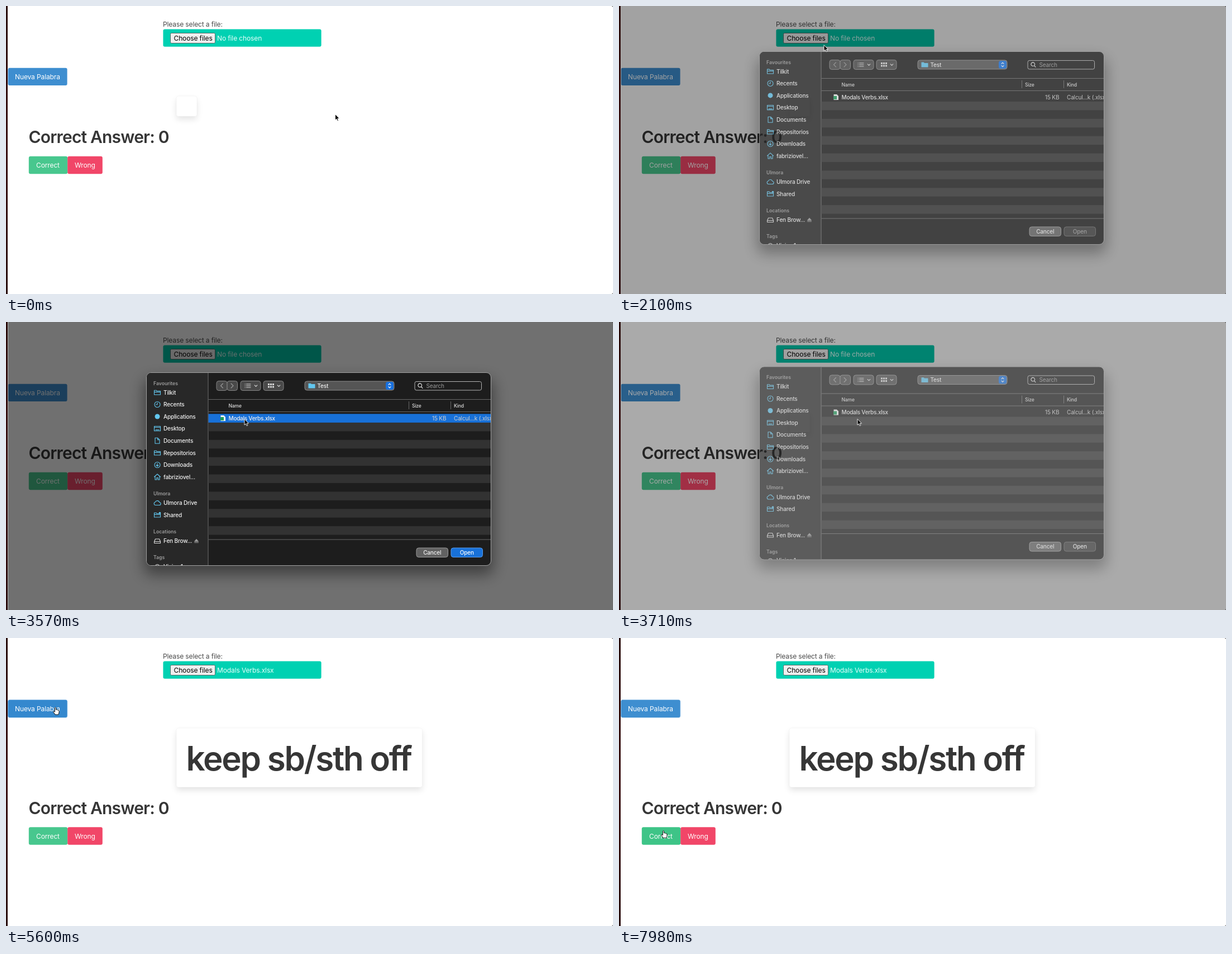
Animation of 1087 by 515 pixels, one loop 8 s. Source, as an HTML page:

```html
<!DOCTYPE html>
<html lang="en">
<head>
<meta charset="utf-8">
<title>Word practice</title>
<style>
  html, body { margin: 0; width: 100%; height: 100%; overflow: hidden; background: #fff; }
  svg { display: block; width: 1087px; height: 515px; }
  text { font-family: Inter, "Liberation Sans", sans-serif; white-space: pre; }
  .body { font-size: 12px; letter-spacing: -.01em; }
  .head { font-size: 30px; font-weight: 600; letter-spacing: -.0275em; fill: #363636; }
  .word { font-size: 60px; font-weight: 600; letter-spacing: -.037em; fill: #363636; }
  .item { font-size: 10px; font-weight: 500; letter-spacing: -.015em; fill: #f2f2f2; }
  .group { font-size: 8.7px; font-weight: 600; fill: #9c9c9c; }
  .col { font-size: 8.6px; font-weight: 500; letter-spacing: -.02em; fill: #dcdcdc; }
  .icon { fill: none; stroke: #62c6ee; stroke-width: 1.1; stroke-linejoin: round; stroke-linecap: round; }
  .soft { filter: blur(6px); }
  .deep { filter: blur(13px); }
</style>
</head>
<body>
<svg viewBox="0 0 1087 515">
  <defs>
    <linearGradient id="edge" x1="0" y1="0" x2="0" y2="1">
      <stop offset="0" stop-color="#2a0d0c"/>
      <stop offset=".5" stop-color="#3c1213"/>
      <stop offset="1" stop-color="#2a0d0e"/>
    </linearGradient>
    <clipPath id="panel"><rect x="252" y="91" width="616" height="344" rx="8"/></clipPath>
  </defs>

  <rect width="1087" height="515" fill="#fff"/>

  <text class="body" x="281" y="37" fill="#4a4a4a">Please select a file:</text>
  <rect id="input" x="281.4" y="41.5" width="283.2" height="31.2" rx="3"/>
  <rect x="294.5" y="48.5" width="80" height="18" rx="2" fill="#efefef" stroke="#5c6b68"/>
  <text class="body" x="300.5" y="62" fill="#000">Choose files</text>
  <text class="body" id="file" x="378" y="62" fill="#e9fffb"></text>

  <rect id="ring" x="3" y="110" width="107.3" height="33" rx="4" fill="#b9d7f0"/>
  <rect id="next" x="3.6" y="110.7" width="106" height="31.4" rx="3"/>
  <text class="body" x="16" y="131" fill="#fff">Nueva Palabra</text>

  <rect id="shade" class="soft" x="305.5" y="167" fill="#0a0a0a" opacity=".11"/>
  <rect id="card" x="305" y="161" rx="4" fill="#fff" stroke="#0a0a0a" stroke-opacity=".03"/>
  <text class="word" id="word" x="322.5" y="237">keep sb/sth off</text>

  <g id="score">
    <text class="head" x="40.5" y="245">Correct Answer: 0</text>
    <rect id="right" x="40.8" y="268.8" width="69.4" height="31.4" rx="3"/>
    <rect id="wrong" x="110.2" y="268.8" width="62.6" height="31.4" rx="3"/>
    <text class="body" x="54" y="289" fill="#fff">Correct</text>
    <text class="body" x="123" y="289" fill="#fff">Wrong</text>
  </g>

  <rect id="dim" x="3" width="1084" height="515" fill="#000"/>
  <rect id="rim" x="3" width="1" height="515" fill="#b4b4b4"/>
  <rect width="3" height="515" fill="url(#edge)"/>
  <path d="M1087 512v3h-3q3 0 3-3M1084 0h3v2q-1-2-3-2" fill="#555"/>

  <g id="dialog">
    <rect class="deep" x="247" y="102" width="626" height="350" rx="14" fill="#000" opacity=".42"/>
    <rect x="251.5" y="90.5" width="617" height="345" rx="8.5" fill="#1d1d1d" stroke="#a2a2a2"/>
    <g id="content" clip-path="url(#panel)"></g>
  </g>

  <g id="cursor" stroke-linejoin="round">
    <path id="arrow" d="M0 0V10.6L2.5 8.4L4.1 12.1L5.9 11.3L4.3 7.7H7.5Z" fill="#000" stroke="#fff" stroke-width=".9"/>
    <path id="hand" d="M-1.1 .9Q0 -.7 1.1 .9V4.4Q2.2 3.5 3.1 4.8Q4.2 4 5 5.2Q6.4 4.7 6.5 6.4V9.2Q6.3 11 5.2 13H-.5Q-1.5 10.9-3.6 8.7Q-4.3 7.2-2.9 6.9L-1.1 8.2Z"
      fill="#fff" stroke="#111" stroke-width="1"/>
  </g>
</svg>

<script>
const LOOP = 8000, STEP = 70;
const OPEN = 2030, SELECT = 3360, CLOSE = 3710, CLOSED = 3920, NEW_WORD = 5110;
const SHIFT = 69.5;
const $ = id => document.getElementById(id);

function add(tag, attrs, label) {
  const node = document.createElementNS('http://www.w3.org/2000/svg', tag);
  for (const key in attrs) node.setAttribute(key, attrs[key]);
  if (label) node.textContent = label;
  $('content').append(node);
  return node;
}
const box = (x, y, width, height, fill, rx = 0, stroke = 'none') =>
  add('rect', { x, y, width, height, fill, rx, stroke });
// Text is placed by its vertical centre.
const write = (x, y, label, cls = 'item', extra = {}) =>
  add('text', { x, y: y + 3.6, class: cls, ...extra }, label);
const draw = (x, y, d, extra = {}) =>
  add('path', { d, transform: `translate(${x} ${y})`, class: 'icon', ...extra });

const ICONS = {
  folder: 'M-5.5 4V-3.8H-2L-1-2.5H5.5V4ZM-5.5-.6H5.5',
  clock: 'M5 0A5 5 0 1 1-5 0A5 5 0 1 1 5 0M0-3V.3H-2.4',
  desktop: 'M-5.5-4H5.5V4.2H-5.5ZM-5.5-2H5.5M-3 2.4H3',
  page: 'M-4-5H.6L4-1.6V5H-4ZM.6-5V-1.6H4',
  down: 'M5 0A5 5 0 1 1-5 0A5 5 0 1 1 5 0M0-2.6V2.4M-2 .5L0 2.5L2 .5',
  home: 'M-5.6 0L0-5L5.6 0M-4-1V5H-1.2V1.5H1.2V5H4V-1',
  cloud: 'M-3.3 4H3.4A2.5 2.5 0 0 0 3.8-1A4 4 0 0 0-3.7-1.5A2.8 2.8 0 0 0-3.3 4Z',
  drive: 'M-5.5 1L-3.5-3.5H3.5L5.5 1V4H-5.5ZM-5.5 1H5.5'
};

function buildSidebar() {
  box(252, 91, 110, 344, '#282828');
  box(361.5, 91, 1, 344, '#707070');
  for (const [label, y] of [['Favourites', 109], ['Ulmora', 306], ['Locations', 374], ['Tags', 420.5]])
    write(264, y, label, 'group');
  const items = [
    ['Tilkit', 126, 'folder'], ['Recents', 147.5, 'clock'], ['Applications', 169],
    ['Desktop', 190.5, 'desktop'], ['Documents', 212.3, 'page'], ['Repositorios', 234, 'folder'],
    ['Downloads', 255.5, 'down'], ['fabriziovel...', 277, 'home'],
    ['Ulmora Drive', 323.5, 'cloud'], ['Shared', 345, 'folder'], ['Fen Brow...', 391.5, 'drive']
  ];
  for (const [label, y, icon] of items) {
    write(282, y, label);
    if (icon) draw(271, y, ICONS[icon], icon === 'drive' ? { style: 'stroke:#ddd' } : {});
    else add('circle', { cx: 271, cy: y, r: 4.5, fill: '#62c6ee' });
  }
  add('circle', { cx: 275.5, cy: 341.5, r: 1.8, fill: '#62c6ee' });
  draw(341, 391.5, 'M-3.4 1L0-3L3.4 1ZM-3.4 3H3.4', { style: 'stroke:#999;fill:#999' });
  add('circle', { cx: 271, cy: 437.5, r: 4, fill: 'none', stroke: '#ddd' });
  write(282, 437, 'Viajes 1');
}

function buildToolbar() {
  const line = { style: 'stroke:#d8d8d8' };
  for (const [x, w] of [[377, 19], [396, 18.5], [420, 36], [461, 36]])
    box(x, 105.5, w, 17, '#494949', 4, '#858585');
  draw(386.5, 114, 'M2-4L-2 0L2 4', { style: 'stroke:#999' });
  draw(405, 114, 'M-2-4L2 0L-2 4', { style: 'stroke:#999' });
  draw(433, 114, 'M-5-3H-4.6M-2.5-3H5M-5 0H-4.6M-2.5 0H5M-5 3H-4.6M-2.5 3H5', line);
  for (let i = 0; i < 6; i++) box(469 + i % 3 * 4, 110 + (i / 3 | 0) * 4.5, 3, 3, '#d8d8d8');
  for (const x of [447.5, 488.5]) draw(x, 114, 'M-2.3-1L0 1.3L2.3-1', line);

  box(535, 106, 160, 16, '#555', 4, '#8c8c8c');
  draw(547.5, 114, ICONS.folder, { style: 'fill:#62c6ee' });
  write(557.5, 114, 'Test');
  box(680, 107, 14, 14, '#1870dd', 3.5);
  draw(687, 114, 'M-2-1.6L0-3.8L2-1.6M-2 1.6L0 3.8L2 1.6', { style: 'stroke:#fff' });

  box(732, 106.5, 119.5, 15.5, '#1d1d1d', 3, '#b4b4b4');
  draw(741.5, 114, 'M3-.8A3.3 3.3 0 1 1-3.6-.8A3.3 3.3 0 1 1 3-.8M2 1.7L4.5 4.3', { style: 'stroke:#eee' });
  write(752.5, 114.3, 'Search', 'item', { style: 'fill:#9a9a9a;font-weight:400' });
}

function buildList() {
  for (let i = 0; i < 7; i++) box(362.5, 180 + i * 30.86, 506, 15.4, '#323232');
  for (const y of [138, 160, 388.5]) box(362.5, y, 506, 1, '#686868');
  for (const x of [721, 796]) box(x, 142, 1, 14, '#686868');
  for (const [x, label] of [[398.5, 'Name'], [727, 'Size'], [802, 'Kind']]) write(x, 149, label, 'col');
  box(362.5, 164.3, 506, 15.6, '#1871d9').id = 'row';
  draw(388.5, 172, 'M-4-5H1.5L4.5-2V5H-4Z', { style: 'fill:#f4f4f4;stroke:none' });
  box(384, 170, 6, 6, '#1f9d5a');
  write(398.5, 172.2, 'Modals Verbs.xlsx', 'item', { style: 'letter-spacing:-.025em' });
  const dim = { style: 'fill:#d0d0d0;font-weight:400' };
  write(763, 172.2, '15 KB', 'item', dim);
  write(802, 172.2, 'Calcul...k (.xlsx)', 'item', dim);

  box(735, 404, 56.5, 16.5, '#626262', 4, '#9a9a9a');
  write(763.3, 412.3, 'Cancel', 'item', { 'text-anchor': 'middle' });
  box(797, 404, 56.5, 16.5, '#3a3a3a', 4, '#666').id = 'open';
  write(825.2, 412.3, 'Open', 'item', { 'text-anchor': 'middle' }).id = 'openText';
}

buildSidebar();
buildToolbar();
buildList();

// Cursor stops: time, x, y
const PATH = [
  [0, 589.5, 193.5], [210, 589.5, 193.5], [910, 388, 90], [1120, 388, 90],
  [1400, 370, 77], [1680, 352, 60], [1960, 352, 60], [2240, 382, 79.5],
  [2380, 382, 79.5], [2940, 427, 173.5], [3990, 427, 173.5], [4410, 150, 140],
  [4620, 150, 140], [5040, 88.5, 124], [5670, 88.5, 124], [6160, 436, 338],
  [6580, 436, 338], [6720, 435, 337.5], [6790, 435, 337.5], [7630, 140, 352],
  [7980, 79.5, 344.5]
];

function cursorAt(t) {
  const i = PATH.findIndex(stop => stop[0] > t);
  if (i < 0) return PATH[PATH.length - 1].slice(1);
  const [t0, x0, y0] = PATH[i - 1], [t1, x1, y1] = PATH[i];
  const u = (t - t0) / (t1 - t0), e = u * u * (3 - 2 * u);
  return [x0 + (x1 - x0) * e, y0 + (y1 - y0) * e];
}

function presence(t) {
  if (t < OPEN || t >= CLOSED) return 0;
  if (t >= CLOSE) return ((CLOSED - t) / 280) ** 1.8;
  const u = Math.min(1, (t - OPEN + STEP) / 420);
  return 1 - (1 - u) ** 2.6;
}

const set = (id, key, value) => $(id).setAttribute(key, value);
const show = (id, on) => set(id, 'visibility', on ? 'visible' : 'hidden');

function render(t) {
  const [x, y] = cursorAt(t);
  const over = (l, top, r, b) => x >= l && x <= r && y >= top && y <= b;
  const hasWord = t >= NEW_WORD, shift = hasWord ? SHIFT : 0;
  const busy = t >= OPEN && t < CLOSED;
  const onInput = busy || over(282, 42, 564, 72);
  const onNext = over(4, 111, 109, 142);
  const onRight = over(41, 269 + shift, 110, 300 + shift);
  const onWrong = !onRight && over(110, 269 + shift, 172, 300 + shift);

  set('input', 'fill', onInput ? '#00c4a7' : '#00d1b2');
  set('next', 'fill', onNext ? '#3488ce' : '#3e8ed0');
  set('right', 'fill', onRight ? '#3ec487' : '#48c78e');
  set('wrong', 'fill', onWrong ? '#f03a5f' : '#f14668');
  $('file').textContent = t < CLOSED ? 'No file chosen' : 'Modals Verbs.xlsx';

  show('ring', hasWord);
  show('word', hasWord);
  const w = hasWord ? 440.5 : 37, h = hasWord ? 106 : 36.5;
  set('card', 'width', w);
  set('card', 'height', h);
  set('shade', 'width', w - 1);
  set('shade', 'height', h - 1);
  set('score', 'transform', `translate(0 ${shift})`);

  const p = presence(t);
  set('dim', 'opacity', .56 * p);
  set('rim', 'opacity', p);
  show('dialog', p > 0);
  set('dialog', 'opacity', t < CLOSE ? Math.min(1, p * 1.1) : p);
  set('dialog', 'transform', `translate(0 ${-26 * (1 - p)})`);
  const picked = t >= SELECT && t < CLOSE;
  set('row', 'opacity', picked ? 1 : 0);
  set('open', 'fill', picked ? '#1871d9' : '#3a3a3a');
  set('open', 'stroke', picked ? '#5b9cea' : '#666');
  set('openText', 'style', `fill:${picked || t >= CLOSE ? '#fff' : '#9a9a9a'}`);

  const hand = onNext || onRight || onWrong;
  set('arrow', 'opacity', hand ? 0 : 1);
  set('hand', 'opacity', hand ? 1 : 0);
  set('cursor', 'transform', `translate(${x} ${y})`);
}

function tick() {
  const t = performance.now() % LOOP;
  render(Math.floor(t / STEP) * STEP);
  requestAnimationFrame(tick);
}
tick();
</script>
</body>
</html>
```
